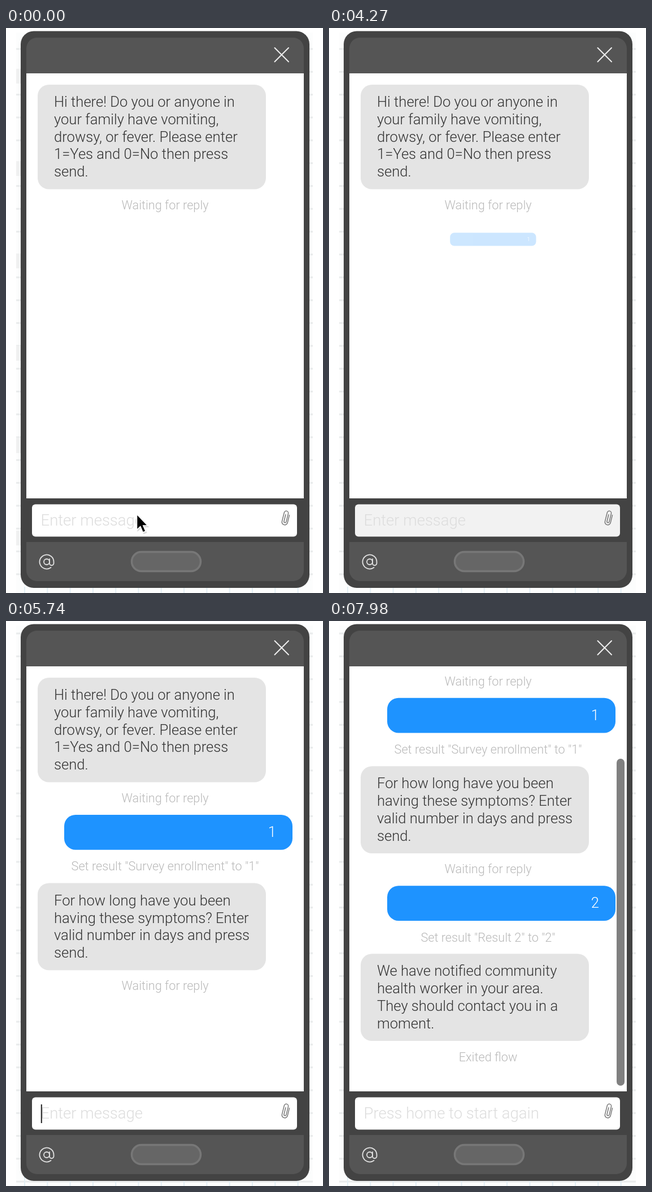
Write an HTML page that moves like this. It is 561 px wide and 997 px high and loops after 8 s.

```html
<!DOCTYPE html>
<html lang="en">
<head>
<meta charset="utf-8">
<title>Survey chat</title>
<style>
  html, body { margin: 0; width: 100%; height: 100%; overflow: hidden; background: #fff; }
  svg { display: block; width: 100vw; height: 100vh; }
  text { font-family: Roboto, sans-serif; font-weight: 300; white-space: pre; }
  .msg { font-size: 25.6px; fill: #333; }
  .reply { font-size: 25.6px; fill: #fff; text-anchor: end; }
  .note { font-size: 21.7px; fill: #b9b9b9; text-anchor: middle; }
  .field { font-size: 27.5px; }
  .line { fill: none; stroke-linecap: round; stroke-linejoin: round; }
</style>
</head>
<body>
<svg id="stage" viewBox="0 0 561 997">
  <defs>
    <clipPath id="screen"><rect x="36" y="80" width="491" height="750"/></clipPath>
    <clipPath id="backdrop"><rect x="18" y="8" width="525" height="989"/></clipPath>
  </defs>

  <g clip-path="url(#backdrop)">
    <rect x="18" y="8" width="525" height="989" fill="#fcfdfd"/>
    <g id="grid"></g>
    <g id="blocks" fill="#f0f1f1"></g>
  </g>

  <rect x="26" y="5.5" width="511" height="982.5" rx="23" fill="#434343"/>
  <path d="M36 80V36a19 19 0 0 1 19-19H508a19 19 0 0 1 19 19V80Z" fill="#555"/>
  <path class="line" d="M475.500 35l24.500 24.500M500 35l-24.500 24.500" stroke="#eee" stroke-width="2"/>
  <rect x="36" y="80" width="491" height="750" fill="#fff"/>

  <g clip-path="url(#screen)">
    <g id="chat"></g>
    <rect id="bar" x="509" y="243" width="14" height="577" rx="7" fill="#808080"/>
  </g>

  <rect id="input" x="46" y="840.5" width="469" height="57" rx="6"/>
  <text id="hint" class="field" x="61.500" y="878" fill="#ddd"></text>
  <text id="typed" class="field" x="61.500" y="878" fill="#333"></text>
  <rect id="caret" y="853" width="2" height="33" fill="#222"/>
  <path class="line" transform="translate(495 865) rotate(14)" stroke="#777" stroke-width="1.500"
    d="M5-7V7A5 5 0 0 1-5 7V-9A3.700 3.700 0 0 1 2.400-9V6A2 2 0 0 1-1.600 6V-6"/>

  <path d="M36 907H527V957a19 19 0 0 1-19 19H55a19 19 0 0 1-19-19Z" fill="#555"/>
  <g class="line" stroke="#e2e2e2" stroke-width="1.800">
    <circle cx="72" cy="942" r="5"/>
    <path d="M77 937v7.500a3.750 3.750 0 0 0 7.500 0V942A12.500 12.500 0 1 0 79.500 952"/>
  </g>
  <rect x="222.500" y="924.500" width="122" height="34" rx="17" fill="#666" stroke="#777" stroke-width="3.500"/>

  <g id="mouse">
    <path d="M1 3V31L8 25L12 35L18 33L14 23H22Z" fill="#000" opacity=".15"/>
    <path d="M0 0V27.500L6.300 21.700L10.700 32L15.600 30L11.300 20H19.200Z" fill="#000" stroke="#fff" stroke-width="1.600"/>
  </g>
</svg>
<script>
const LOOP = 8000, ZOOM = 200, CENTER = 281.5, LINE = 30.7, PITCH = 40.3;
const $ = id => document.getElementById(id);
const clamp = x => Math.max(0, Math.min(1, x));
const smooth = x => { x = clamp(x); return x * x * (3 - 2 * x); };
const within = (t, spans) => spans.some(([a, b]) => t >= a && t < b);
const show = (el, on) => el.setAttribute('visibility', on ? 'visible' : 'hidden');

function add(parent, tag, attrs, text) {
  const el = document.createElementNS('http://www.w3.org/2000/svg', tag);
  for (const k in attrs) el.setAttribute(k, attrs[k]);
  if (text) el.textContent = text;
  parent.append(el);
  return el;
}

// kind, top, start time, lines
const items = [
  ['msg', 100, -ZOOM, 'Hi there! Do you or anyone in', 'your family have vomiting,',
    'drowsy, or fever. Please enter', '1=Yes and 0=No then press', 'send.'],
  ['note', 300, -ZOOM, 'Waiting for reply'],
  ['reply', 342, 4249, '1'],
  ['note', 420, 4440, 'Set result "Survey enrollment" to "1"'],
  ['msg', 462.5, 4470, 'For how long have you been', 'having these symptoms? Enter',
    'valid number in days and press', 'send.'],
  ['note', 631, 4800, 'Waiting for reply'],
  ['reply', 673.5, 7190, '2'],
  ['note', 752, 7440, 'Set result "Result 2" to "2"'],
  ['msg', 793.5, 7470, 'We have notified community', 'health worker in your area.',
    'They should contact you in a', 'moment.'],
  ['note', 963, 7495, 'Exited flow']
].map(([kind, top, start, ...lines]) => {
  const g = add($('chat'), 'g');
  const height = kind === 'note' ? 25 : lines.length * LINE + 31;
  const x = { msg: 85, reply: 478, note: CENTER }[kind];
  if (kind !== 'note') {
    add(g, 'rect', { x: kind === 'msg' ? 56 : 103, y: top, width: 404, height, rx: 20,
      fill: kind === 'msg' ? '#e4e4e4' : '#1e93ff' });
  }
  const base = top + (kind === 'note' ? 20 : 39.3);
  lines.forEach((s, i) => add(g, 'text', { class: kind, x, y: base + i * LINE }, s));
  return { g, start, mid: top + height / 2 };
});

for (let i = -1; i < 27; i++) {
  const y = 37 + i * PITCH;
  add($('grid'), 'rect', { x: 18, y: y - 1.5, width: 525, height: 3, fill: '#e9ebec' });
}
for (let x = 32; x < 543; x += PITCH) {
  add($('grid'), 'rect', { x, y: 986, width: 2, height: 40, fill: '#e3eff5' });
}
for (let y = 72; y < 960; y += 163) add($('blocks'), 'rect', { x: 18, y, width: 8, height: 26 });

const caretOn = [[1890, 2380], [2590, 3150], [3640, 3920], [4690, 5250],
  [5740, 6300], [6510, 6860], [7420, 7980]];
const busy = [[3920, 4690], [6860, 7420]];

function draw(t) {
  for (const { g, start, mid } of items) {
    const p = clamp((t - start) / ZOOM), k = 0.3 + 0.7 * p;
    g.setAttribute('opacity', clamp(2 * p));
    g.setAttribute('transform', `translate(${CENTER * (1 - k)} ${mid * (1 - k)}) scale(${k})`);
  }

  const scrolled = t >= 7400;
  $('chat').setAttribute('transform', `translate(0 ${scrolled ? -206.3 : 0})`);
  show($('bar'), scrolled);

  const typed = within(t, [[2590, 3920]]) ? '1' : within(t, [[6510, 6860]]) ? '2' : '';
  $('typed').textContent = typed;
  $('hint').textContent = typed ? '' : t >= 7420 ? 'Press home to start again' : 'Enter message';
  $('input').setAttribute('fill', within(t, busy) ? '#f2f2f2' : '#fff');
  $('caret').setAttribute('x', typed ? 76.2 : 61.8);
  show($('caret'), within(t, caretOn));

  const m = smooth((t - 1340) / 270);
  $('mouse').setAttribute('transform', `translate(${231.5 - 38 * m} ${858 + 6 * m})`);
  show($('mouse'), t < 2590);

  show($('blocks'), t < 560);
  $('grid').setAttribute('transform', `translate(0 ${-15 * smooth((t - 4690) / 500)})`);
}

const begin = performance.now();
function tick() {
  draw((performance.now() - begin) % LOOP);
  requestAnimationFrame(tick);
}
tick();
</script>
</body>
</html>
```
